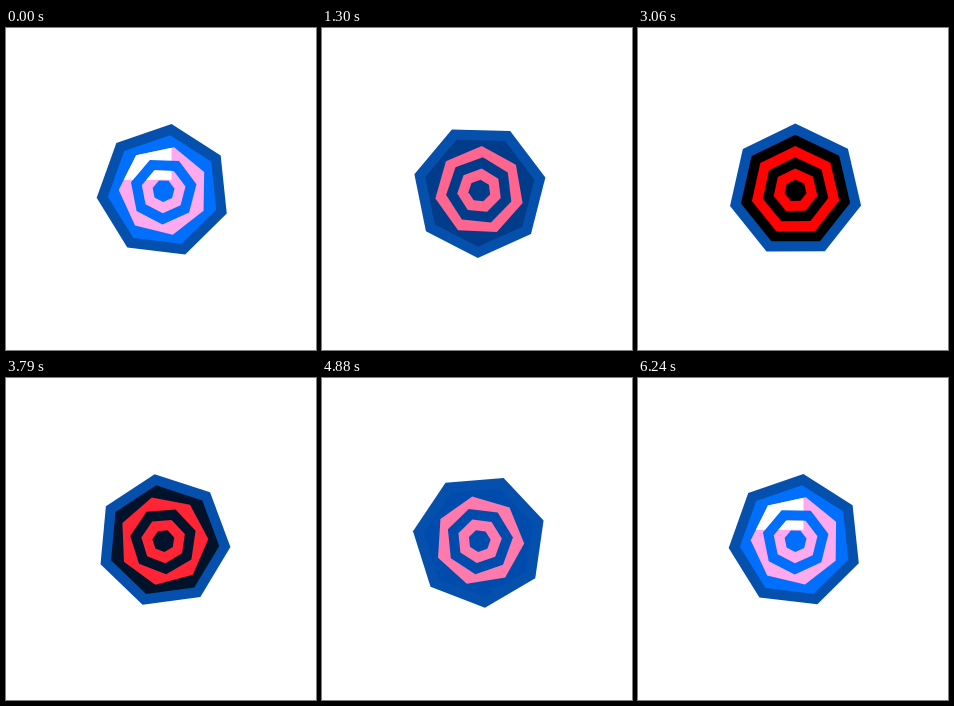
Write an HTML page with a canvas that moves like this. It is 310 px wide and 322 px high and loops after 6270 ms.

```html
<!DOCTYPE html>
<html lang="en">
<head>
<meta charset="utf-8">
<title>Turning heptagons</title>
<style>
html, body { margin: 0; width: 310px; height: 322px; overflow: hidden; background: #fff; }
canvas { display: block; }
</style>
</head>
<body>
<canvas id="stage" width="310" height="322"></canvas>
<script>
const ctx = document.getElementById('stage').getContext('2d');
const LOOP = 6270, STEP = 30, PEAK = 2936;
const CX = 157.5, CY = 162.8, RADIUS = 67.2, SIDES = 7, RINGS = 6;
const SWING = Math.PI / 4;
const BORDER = 'rgb(4,80,172)';

function heptagon(radius, angle, color) {
  ctx.beginPath();
  for (let i = 0; i < SIDES; i++) {
    const a = angle + i * 2 * Math.PI / SIDES;
    ctx.lineTo(CX + radius * Math.sin(a), CY - radius * Math.cos(a));
  }
  ctx.closePath();
  ctx.fillStyle = color;
  ctx.fill();
}

// White upper left part of the heptagon just drawn
function gloss() {
  ctx.save();
  ctx.clip();
  ctx.fillStyle = '#fff';
  ctx.fillRect(0, 0, CX + 8, CY - 11);
  ctx.restore();
}

function draw(t) {
  // p runs from 0 (upright, dark) to 1 (fully turned, bright)
  const p = (1 - Math.cos(2 * Math.PI * (t - PEAK) / LOOP)) / 2;
  const glow = p ** 0.85;
  const dark = `rgb(0,${112 * p},${255 * p})`;
  const light = `rgb(255,${170 * glow},${240 * glow})`;

  ctx.fillStyle = '#fff';
  ctx.fillRect(0, 0, 310, 322);
  for (let k = 0; k < RINGS; k++) {
    // inner heptagons turn two and four times as fast
    const speed = 2 ** Math.min(2, Math.max(0, k - 1));
    const isLight = k > 0 && k % 2 === 0;
    const color = k === 0 ? BORDER : isLight ? light : dark;
    heptagon(RADIUS * (RINGS - k) / RINGS, -SWING * p * speed, color);
    if (isLight && p > 0.985) gloss();
  }
}

const start = performance.now();
function tick() {
  const t = (performance.now() - start) % LOOP;
  draw(Math.floor(t / STEP) * STEP);
  requestAnimationFrame(tick);
}
tick();
</script>
</body>
</html>
```
